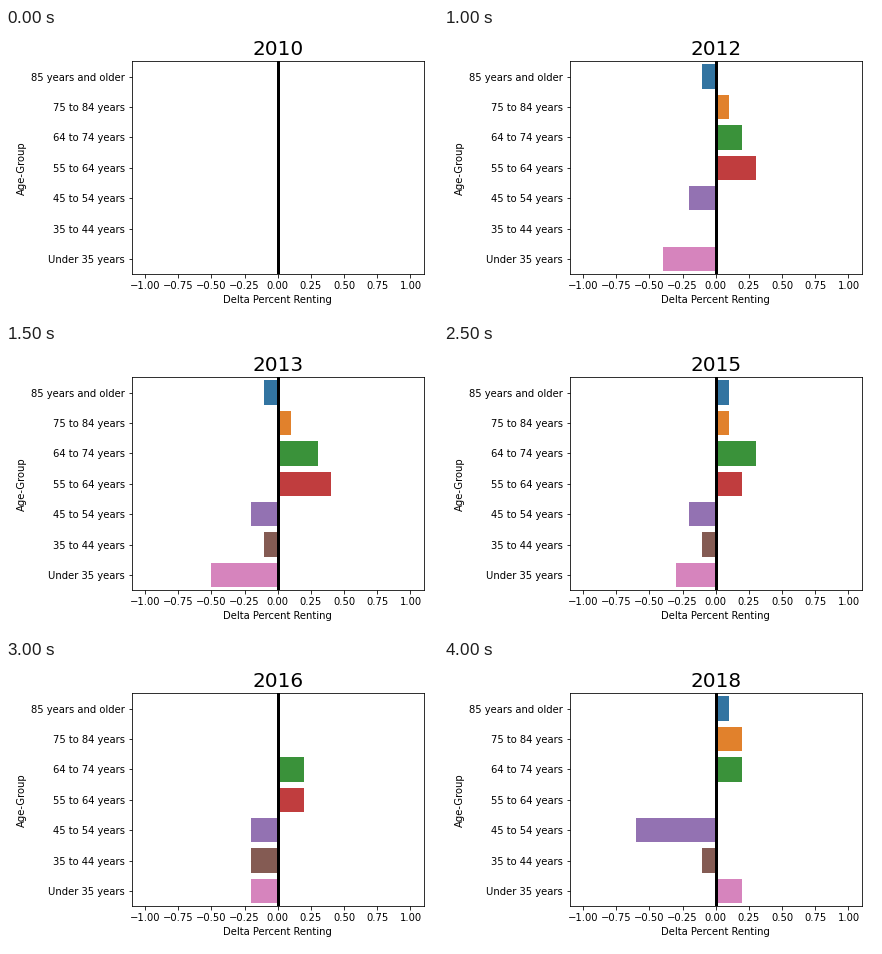
Animation, 432 px wide and 288 px high, one loop 4.5 s. Source, as a matplotlib script:

```python
import colorsys

import matplotlib.pyplot as plt
import numpy as np
from matplotlib.animation import FuncAnimation
from matplotlib.colors import to_rgb

plt.rcParams["font.family"] = "DejaVu Sans"

W, H, DPI = 432, 288, 72
START_YEAR, YEARS = 2010, 9
STEP_MS = 500

# Tenths of a percent at the key years; the years between are interpolated
KEY_YEARS = [2010, 2011, 2012, 2014, 2015, 2017, 2018]
GROUPS = {
    "85 years and older": [0, 1, -1, -1, 1, 0, 1],
    "75 to 84 years": [0, -1, 1, 1, 1, 0, 2],
    "64 to 74 years": [0, 1, 2, 4, 3, 2, 2],
    "55 to 64 years": [0, 5, 3, 4, 2, 2, 0],
    "45 to 54 years": [0, -1, -2, -2, -2, -2, -6],
    "35 to 44 years": [0, 3, 0, -2, -1, -2, -1],
    "Under 35 years": [0, -7, -4, -6, -3, -2, 2],
}


def muted(color, keep=0.75):
    hue, light, sat = colorsys.rgb_to_hls(*to_rgb(color))
    return colorsys.hls_to_rgb(hue, light, sat * keep)


def delta(keys, year):
    return np.round(np.interp(year, KEY_YEARS, keys)) / 10


fig = plt.figure(figsize=(W / DPI, H / DPI), dpi=DPI, facecolor="white")
ax = fig.add_axes([125.72 / W, 41.77 / H, 292 / W, 212.8 / H])

rows = np.arange(len(GROUPS))
colors = [muted(f"C{i}") for i in rows]
bars = ax.barh(rows, np.zeros(len(rows)), height=0.8, color=colors, linewidth=0)
ax.axvline(0, color="black", linewidth=3)
ax.set_xlim(-1.1, 1.1)
ax.set_ylim(len(rows) - 0.5, -0.5)
ax.set_xticks(np.arange(-1, 1.01, 0.25))
ax.set_yticks(rows, list(GROUPS))
ax.set_xlabel("Delta Percent Renting")
ax.set_ylabel("Age-Group")
title = ax.set_title(str(START_YEAR), fontsize=20)


def update(i):
    year = START_YEAR + i
    for bar, keys in zip(bars, GROUPS.values()):
        bar.set_width(delta(keys, year))
    title.set_text(str(year))
    return [*bars, title]


anim = FuncAnimation(fig, update, frames=YEARS, interval=STEP_MS,
                     repeat=True, repeat_delay=0, blit=False)
plt.show()
```
